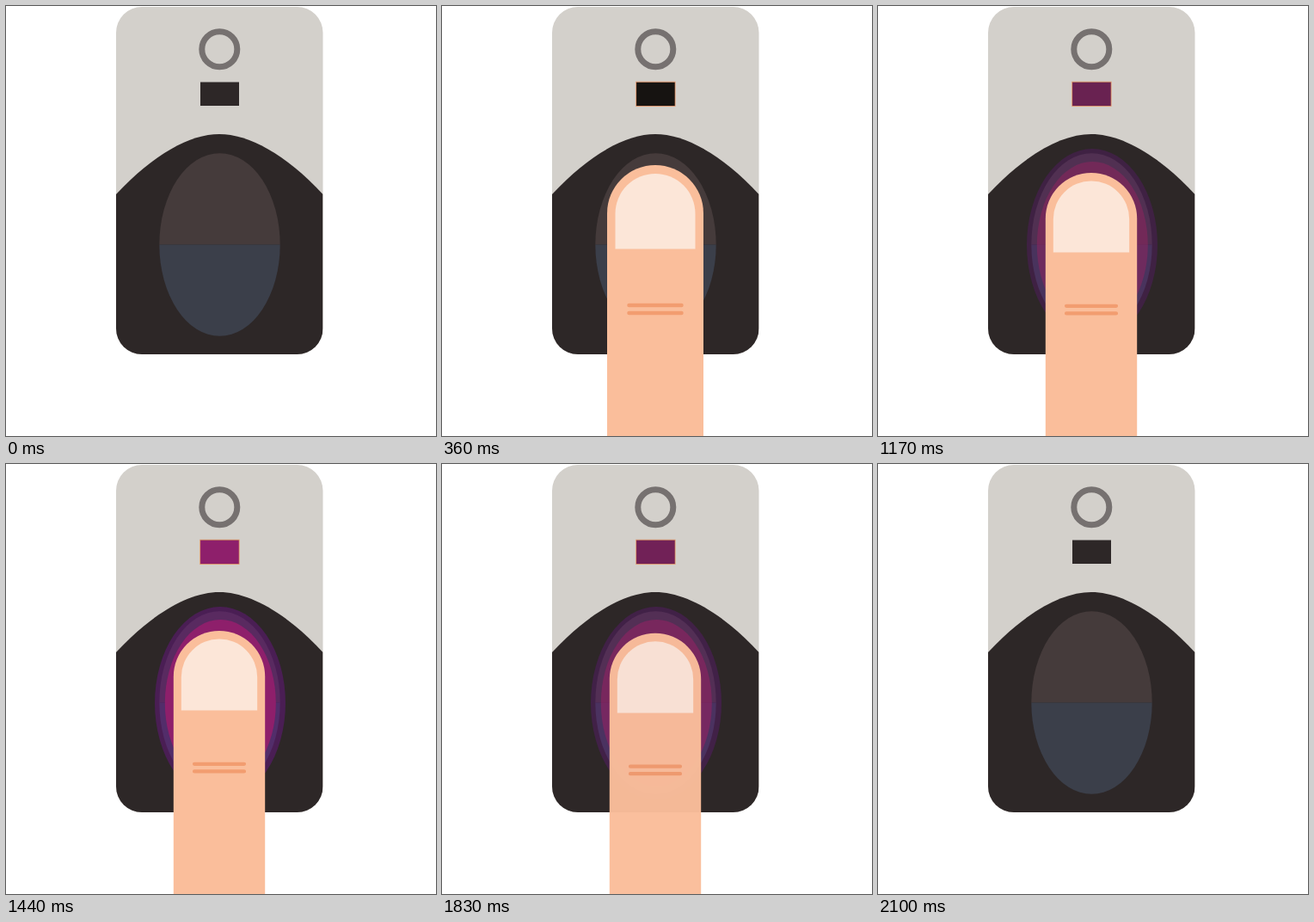
An HTML page that plays this animation: 500x500 px, repeating every 2.4 s.

```html
<!DOCTYPE html>
<html>
<head>
<meta charset="utf-8">
<style>
html, body { margin: 0; width: 100%; height: 100%; overflow: hidden; background: #fff; }
svg { display: block; width: 100%; height: 100%; }
</style>
</head>
<body>
<svg viewBox="0 0 500 500">
  <clipPath id="body"><rect x="128" y="1" width="240.5" height="404" rx="30"/></clipPath>
  <g clip-path="url(#body)">
    <rect x="128" y="1" width="241" height="404" fill="#d3d0cb"/>
    <path d="M128 219C172 172 214 149 248 149S325 172 368.5 219V405H128Z" fill="#2d2727"/>
  </g>
  <circle cx="248.3" cy="50.3" r="20.5" fill="none" stroke="#767170" stroke-width="7"/>
  <path d="M178.3 277.5a70 106 0 0 1 140.4 0z" fill="#453b3b"/>
  <path d="M178.3 277.5a70 106 0 0 0 140.4 0z" fill="#3b3f4a"/>
  <rect id="lamp" x="226" y="88.5" width="45" height="27.5" fill="#2d2727"/>
  <g id="glow">
    <ellipse cx="249" cy="278" rx="76" ry="112" fill="#75139a" fill-opacity=".4"/>
    <ellipse cx="249.3" cy="278" rx="64.5" ry="97" fill="#8e1f6b"/>
    <rect x="226" y="88.5" width="45" height="27.5" fill="#8e1f6b"/>
  </g>
  <rect id="rim" x="225.7" y="88.2" width="45.4" height="28.2" fill="none" stroke="#e08a5c" stroke-width=".8"/>
  <g id="finger">
    <path d="M192 900V241a56 56 0 0 1 112 0V900z" fill="#fabe9b"/>
    <path d="M201.5 282.5v-41a46.5 46.5 0 0 1 93 0v41z" fill="#fce6d8"/>
    <path d="M217.5 348h61M217.5 357h61" stroke="#f29d70" stroke-width="4.5" stroke-linecap="round"/>
  </g>
</svg>
<script>
const [lamp, glow, rim, finger] = ['lamp', 'glow', 'rim', 'finger'].map(id => document.getElementById(id));
const LOOP = 2400, STEP = 30;

// Smooth 0..1 progress between two times
function ease(t, from, to) {
  const u = Math.min(1, Math.max(0, (t - from) / (to - from)));
  return u * u * (3 - 2 * u);
}

function draw(t) {
  const shown = ease(t, 120, 360) * (1 - ease(t, 1800, 2100));
  const scale = 1 - .1 * ease(t, 720, 870) + .05 * ease(t, 870, 1020);
  finger.setAttribute('opacity', shown);
  finger.setAttribute('transform',
    `translate(248 ${365 + 100 * (1 - shown)}) scale(${scale}) translate(-248 -365)`);

  const light = t < 1170 ? 0 : .62 + .38 * ease(t, 1170, 1440);
  glow.setAttribute('opacity', light * (1 - ease(t, 1680, 2100)));
  lamp.setAttribute('fill', t >= 360 && t < 720 ? '#161311' : '#2d2727');
  rim.setAttribute('opacity', shown);
}

function frame() {
  draw(Math.floor(performance.now() % LOOP / STEP) * STEP);
  requestAnimationFrame(frame);
}
frame();
</script>
</body>
</html>
```
